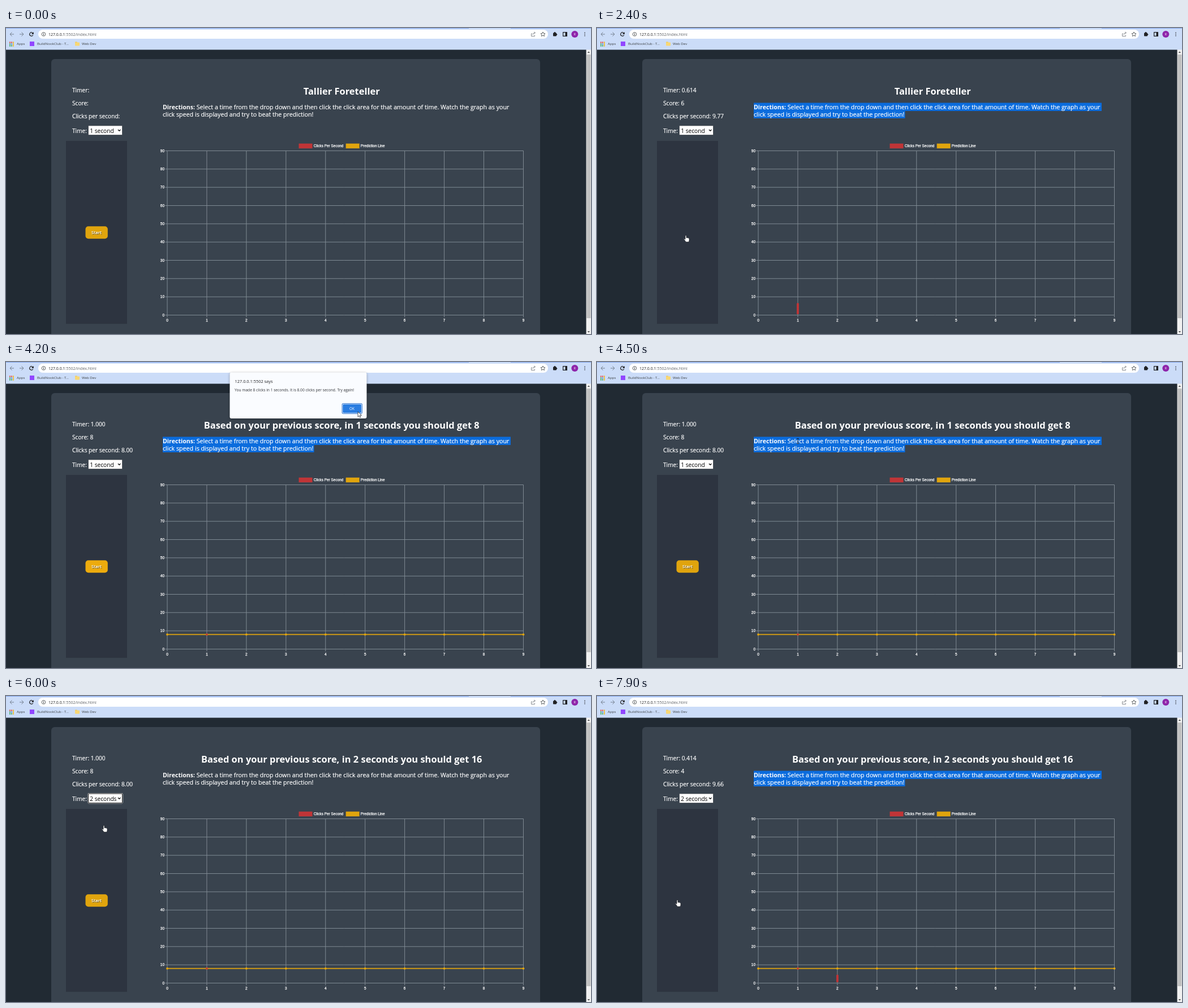
An HTML page with a canvas that plays this animation: 1034 by 542 pixels, repeating every 8 s.

```html
<!DOCTYPE html>
<html lang="en">
<head>
<meta charset="utf-8">
<title>Tallier Foreteller</title>
<style>
html, body { margin: 0; width: 100%; height: 100%; overflow: hidden; background: #212a33; }
canvas { display: block; }
</style>
</head>
<body>
<canvas id="stage" width="1034" height="542"></canvas>
<script>
const ctx = document.getElementById('stage').getContext('2d');
const UI = '"Open Sans", "Noto Sans", sans-serif';
const CHART = '"Liberation Sans", Arial, sans-serif';
const LOOP = 8000, STEP = 100;
const RED = '#c03537', YELLOW = '#e0a40d', BLUE = '#0b6cdd';
const PLOT = { left: 285, right: 914.5, top: 217.5, bottom: 508.5 };
const GAME1 = 1800, ALERT = 2800, CLOSE = 4300, OPEN = 4800, PICK = 5500, GAME2 = 7500;

// time, x, y of the pointer's hot spot
const PATH = [
  [100, 616, 20], [300, 480, 150], [500, 290, 290], [700, 176, 362], [900, 157, 367],
  [3200, 157, 367], [3300, 320, 310], [3400, 468, 257], [3500, 468, 257], [3600, 520, 200],
  [3800, 592, 120], [4000, 622, 88], [4400, 622, 88], [4500, 355, 140], [4600, 192, 183],
  [4700, 192, 183], [5000, 182, 192], [5300, 176, 209], [5400, 176, 209], [6000, 173, 229],
  [6300, 149, 350], [6400, 144, 362], [6500, 144, 362], [6800, 142, 361], [8000, 142, 361]
];

const plotX = v => PLOT.left + (PLOT.right - PLOT.left) * v / 9;
const plotY = v => PLOT.bottom - (PLOT.bottom - PLOT.top) * v / 90;
const inside = (p, x, y, r, b) => p.x >= x && p.x <= r && p.y >= y && p.y <= b;

function rect(x, y, w, h, color) {
  ctx.fillStyle = color;
  ctx.fillRect(x, y, w, h);
}

function round(x, y, w, h, r, color) {
  ctx.beginPath();
  ctx.roundRect(x, y, w, h, r);
  ctx.fillStyle = color;
  ctx.fill();
}

function dot(x, y, r, color) {
  ctx.beginPath();
  ctx.arc(x, y, r, 0, Math.PI * 2);
  ctx.fillStyle = color;
  ctx.fill();
}

function line(points, color, width = 1) {
  ctx.beginPath();
  points.forEach(([x, y], i) => i ? ctx.lineTo(x, y) : ctx.moveTo(x, y));
  ctx.strokeStyle = color;
  ctx.lineWidth = width;
  ctx.stroke();
}

function arc(x, y, r, from, to, color, width) {
  ctx.beginPath();
  ctx.arc(x, y, r, from, to);
  ctx.strokeStyle = color;
  ctx.lineWidth = width;
  ctx.stroke();
}

function shape(d, fill, stroke, width = 1) {
  const path = new Path2D(d);
  if (fill) { ctx.fillStyle = fill; ctx.fill(path); }
  if (stroke) { ctx.strokeStyle = stroke; ctx.lineWidth = width; ctx.stroke(path); }
}

function text(s, x, y, size, color = '#fff', { weight = 400, align = 'left', family = UI, fatten = 0 } = {}) {
  ctx.font = `${weight} ${size}px ${family}`;
  ctx.textAlign = align;
  ctx.fillStyle = color;
  ctx.fillText(s, x, y);
  if (!fatten) return;
  ctx.strokeStyle = color;
  ctx.lineWidth = fatten;
  ctx.lineJoin = 'round';
  ctx.strokeText(s, x, y);
}

const chartText = (s, x, y, align) => text(s, x, y, 6.46, '#fff', { align, family: CHART, fatten: 0.25 });
const bodyText = (s, x, y, size = 10.15) => text(s, x, y, size, '#fff', { fatten: 0.2 });

function drawBrowser() {
  const ink = '#3c4043', black = '#202124';
  rect(0, 0, 1034, 38.5, '#cbdcf8');
  rect(0, 0, 1034, 1, '#86a9ee');
  rect(818, 0, 74, 1, '#cbdcf8');
  round(57, 3, 901, 16, 8, '#fff');
  for (const [x, dir] of [[10.5, -1], [27.5, 1]]) {
    line([[x - 3.5, 11], [x + 3.5, 11]], '#75808f');
    line([[x, 7.5], [x + 3.5 * dir, 11], [x, 14.5]], '#75808f');
  }
  arc(45, 11, 3.2, 0.5, 5.6, black, 1.2);
  shape('M48.8 7v4h-4z', black);
  arc(66.5, 11, 3.3, 0, 7, ink, 0.8);
  rect(66, 10.5, 1, 2.5, ink);
  rect(66, 8.8, 1, 1, ink);
  text('127.0.0.1', 75, 13.5, 7.01, black);
  text(':5502/index.html', 75 + ctx.measureText('127.0.0.1').width, 13.5, 7.01, '#5f6368');

  shape('M930 10h-1.5v4.5h6v-2M931 12q0-3.5 4-3.5M933.5 6.8l2 1.7l-2 1.7', null, '#6b7077', 0.8);
  shape('M949 7l1.2 2.6l2.8.3l-2.1 1.9l.6 2.8l-2.5-1.5l-2.5 1.5l.6-2.8l-2.1-1.9l2.8-.3z', null, ink, 0.8);
  round(967, 8.5, 6, 6, 1, black);
  dot(970, 8.3, 1.3, black);
  dot(973, 11.5, 1.3, black);
  shape('M984.6 7.6h6.8v6.8h-6.8z', null, black, 1.2);
  rect(988.5, 7.5, 3, 7, black);
  dot(1005.3, 11, 6, '#8e24aa');
  text('R', 1005.3, 13, 5.6, '#fff', { align: 'center' });
  for (const y of [8.3, 11, 13.7]) dot(1023, y, 0.8, black);

  const tints = ['#ea4335', '#ea4335', '#f5b400', '#34a853', '#4285f4', '#f5b400', '#34a853', '#34a853', '#f5b400'];
  tints.forEach((c, i) => rect(6 + i % 3 * 3, 24.5 + Math.floor(i / 3) * 3, 2, 2, c));
  rect(42, 24, 8, 8, '#9146ff');
  round(122, 24.5, 4, 3, 0.6, '#f2c94f');
  round(122, 25.5, 8, 6, 0.8, '#f8d775');
  text('Apps', 19, 30.3, 6.15, ink);
  text('BuildNookClub - T...', 55, 30.3, 6.15, ink);
  text('Web Dev', 134, 30.3, 6.15, ink);
}

function drawPage() {
  rect(0, 38, 1034, 504, '#212a33');
  round(80, 55, 864, 500, 6, '#39434e');
  rect(106, 200, 108, 324, '#2d3440');
  rect(1025.5, 38, 8.5, 504, '#f1f1f1');
  rect(1026.3, 47, 7.2, 467, '#c1c1c1');
  shape('M1027.7 44l2.2-2.5l2.2 2.5z', '#505050');
  shape('M1027.7 537l2.2 2.5l2.2-2.5z', '#505050');
}

// Score, clock and rate at a given step of a round
function readings(t) {
  const play = start => {
    const k = Math.min((t - start) / STEP, 8);
    const score = 1 + Math.floor(k * 7 / 8);
    const clock = (k * STEP + 14) / 1000;
    return { score, k, clock: clock.toFixed(3), rate: (score / clock).toFixed(2) };
  };
  const done = { score: 8, clock: '1.000', rate: '8.00' };
  if (t < GAME1) return { score: '', clock: '', rate: '' };
  if (t < ALERT) {
    const r = play(GAME1);
    return r.k ? r : { score: 1, clock: '', rate: '' };
  }
  if (t < GAME2) return done;
  const r = play(GAME2);
  return r.k ? r : { ...done, score: 1 };
}

function drawStats(t) {
  const r = readings(t);
  bodyText(`Timer: ${r.clock}`, 117, 114);
  bodyText(`Score: ${r.score}`, 117, 137);
  bodyText(`Clicks per second: ${r.rate}`, 117, 160.3);
  bodyText('Time:', 117, 185.5);
  if (t >= OPEN && t < GAME2) {
    round(144.5, 172, 62, 18.5, 2, '#fff');
    round(145, 172.5, 61, 17.5, 1.5, '#101010');
  } else {
    rect(145.5, 173, 60, 16.5, '#767676');
  }
  rect(146, 173.5, 59, 15.5, '#fff');
  text(t < PICK ? '1 second' : '2 seconds', 148.3, 185.5, 10.15, '#000');
  line([[198, 180], [200.2, 182.3], [202.4, 180]], '#000', 1.2);
}

function drawHeading(t) {
  let title = 'Tallier Foreteller';
  if (t >= ALERT) {
    const [secs, goal] = t < PICK ? [1, 8] : [2, 16];
    title = `Based on your previous score, in ${secs} seconds you should get ${goal}`;
  }
  text(title, 593.2, 118, 16.48, '#fff', { weight: 700, align: 'center' });
  if ((t > GAME1 && t < OPEN) || t > GAME2) {
    rect(277, 132.5, 615, 14.5, BLUE);
    rect(277, 147, 267.5, 13, BLUE);
  }
  text('Directions:', 277, 144, 10.6, '#fff', { weight: 700 });
  bodyText('Select a time from the drop down and then click the click area for that amount of time. Watch the graph as your', 336.7, 144, 10.7);
  bodyText('click speed is displayed and try to beat the prediction!', 277, 157, 10.7);
}

function drawColumn(second, score) {
  const x = plotX(second);
  line([[x, plotY(1)], [x, plotY(score)]], RED, 3.4);
  for (let n = 1; n <= score; n++) dot(x, plotY(n), 2, RED);
}

function drawChart(t) {
  const grid = '#7f8a93';
  for (let i = 0; i <= 9; i++) {
    const x = plotX(i), y = plotY(i * 10);
    line([[x, PLOT.top], [x, PLOT.bottom + 4]], grid);
    line([[PLOT.left - 4, y], [PLOT.right, y]], grid);
    chartText(String(i * 10), 280, y + 2, 'right');
    chartText(String(i), x, 520.4, 'center');
  }
  rect(517.5, 204.7, 24, 8.5, RED);
  rect(600.7, 204.7, 24, 8.5, YELLOW);
  chartText('Clicks Per Second', 543.7, 210.7, 'left');
  chartText('Prediction Line', 626.8, 210.7, 'left');

  if (t >= ALERT) {
    line([[plotX(0), plotY(8)], [plotX(9), plotY(8)]], YELLOW, 1.7);
    for (let i = 0; i <= 9; i++) dot(plotX(i), plotY(8), 1.9, YELLOW);
    dot(plotX(1), plotY(8), 1.8, RED);
  }
  if (t >= GAME1 && t < ALERT) drawColumn(1, readings(t).score);
  if (t >= GAME2) drawColumn(2, readings(t).score);
}

function drawStart(t, p) {
  if ((t >= GAME1 && t < ALERT) || t >= GAME2) return;
  const frozen = t >= ALERT && t < CLOSE;
  const hover = frozen || (p && inside(p, 141, 351, 180, 373));
  round(140.5, 351.3, 39.3, 22, 5, hover ? '#edab0d' : YELLOW);
  text('Start', 160.9, 365.9, 8, 'rgba(30,30,30,.75)', { align: 'center' });
  text('Start', 160, 365, 8, '#fff', { align: 'center', fatten: 0.2 });
}

function drawList(t, p) {
  if (t < OPEN || t >= PICK) return;
  const h = 13.4;
  rect(145, 190, 61, 122, '#767676');
  rect(145.5, 190.5, 60, 121, '#fff');
  const chosen = p.y > 190.5 + h ? 2 : 1;
  for (let n = 1; n <= 9; n++) {
    const y = 190.7 + (n - 1) * h, on = n === chosen;
    if (on) rect(145.5, y, 60, h, '#1967d2');
    text(`${n} second${n > 1 ? 's' : ''}`, 148.3, y + 10.2, 10.15, on ? '#fff' : '#000');
  }
}

function drawAlert(t) {
  if (t < ALERT || t >= CLOSE) return;
  const phase = (t - ALERT) / STEP;
  const [dy, alpha] = phase < 1 ? [-9, 0.35] : phase < 2 ? [-4.3, 0.8] : [0, 1];
  ctx.save();
  ctx.translate(0, dy);
  ctx.globalAlpha = alpha;
  ctx.shadowColor = 'rgba(0,0,0,.35)';
  ctx.shadowBlur = 4;
  ctx.shadowOffsetY = 1;
  round(395.5, 18.5, 242, 81.5, 3, '#fafcff');
  ctx.shadowColor = 'transparent';
  ctx.globalAlpha = phase < 1 ? 0.5 : 1;
  text('127.0.0.1:5502 says', 404.5, 36.7, 7.4, '#202124');
  text('You made 8 clicks in 1 seconds. It is 8.00 clicks per second. Try again!', 404, 51.8, 6.65, '#303236');
  round(593.5, 73, 36.5, 19, 3, '#3b7bd0');
  round(594.5, 74, 34.5, 17, 2.2, '#fff');
  round(595.2, 74.7, 33, 15.6, 2, t >= 4000 ? '#2a7de1' : BLUE);
  text('OK', 611.5, 84.9, 6.4, '#fff', { align: 'center' });
  ctx.restore();
}

function pointerAt(t) {
  if (t < PATH[0][0]) return null;
  const i = PATH.findIndex((k, n) => n && t <= k[0]);
  const [t0, x0, y0] = PATH[i - 1], [t1, x1, y1] = PATH[i];
  const u = (t - t0) / (t1 - t0);
  return { x: x0 + (x1 - x0) * u, y: y0 + (y1 - y0) * u };
}

function drawPointer(t, p) {
  if (!p) return;
  const listOpen = t >= OPEN && t < PICK, modal = t >= ALERT && t < CLOSE;
  const outline = '#15181d';
  ctx.save();
  ctx.translate(p.x, p.y);
  ctx.lineJoin = 'round';
  if (!listOpen && inside(p, 106, 200, 214, 524)) {
    shape('M-1 .8Q0-.6 1 .8V4.5Q2.2 3.7 3 4.8Q4.2 4.2 4.8 5.4Q6 5 6 6.5V9Q6 10.5 5 12H0Q-1 10-3.5 7Q-3.5 5.4-1 7.3Z', '#fff', outline, 0.7);
  } else if (!listOpen && !modal && inside(p, 277, 132, 892, 160)) {
    shape('M-2-4.5h1.5l.5.5l.5-.5h1.5M0-4v8M-2 4.5h1.5l.5-.5l.5.5h1.5', null, outline, 0.9);
  } else {
    shape('M0 0V9.2L2.1 7.2L3.5 10.3L5 9.6L3.6 6.6H6.5Z', '#fff', outline, 0.7);
  }
  ctx.restore();
}

function draw(t) {
  const p = pointerAt(t);
  drawPage();
  drawBrowser();
  drawStats(t);
  drawHeading(t);
  drawChart(t);
  drawStart(t, p);
  drawList(t, p);
  drawAlert(t);
  drawPointer(t, p);
}

const begin = performance.now();
function tick() {
  const t = (performance.now() - begin) % LOOP;
  draw(Math.floor(t / STEP) * STEP);
  requestAnimationFrame(tick);
}
tick();
</script>
</body>
</html>
```
